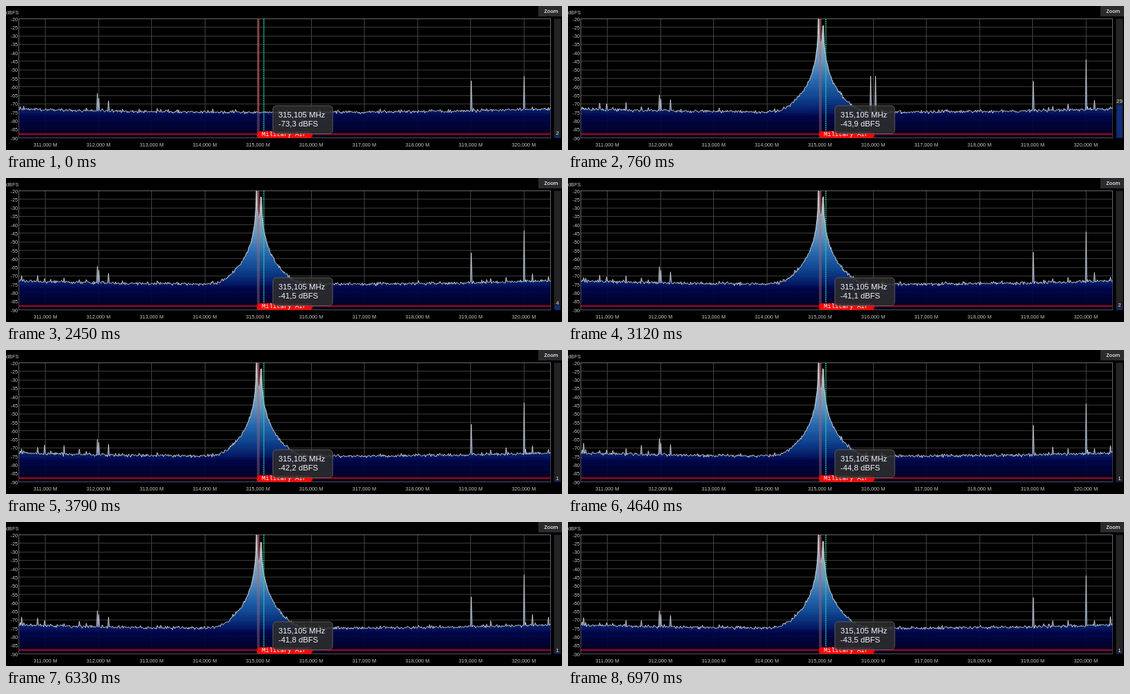
Write an HTML page with a canvas that moves like this. It is 800 px wide and 208 px high and loops after 7000 ms.

```html
<!DOCTYPE html>
<html lang="en">
<head>
<meta charset="utf-8">
<title>Spectrum</title>
<style>
html, body { margin: 0; width: 100%; height: 100%; overflow: hidden; background: #000; }
canvas { display: block; width: 800px; height: 208px; }
</style>
</head>
<body>
<canvas id="view" width="800" height="208"></canvas>
<script>
const LOOP = 7000, STEPS = 211, STEP = LOOP / STEPS, ONSET = 400;
const L = 18.5, R = 783.5, T = 18.5, B = 190.5, DB = (B - T) / 70;
const MID = 363.2, SPLIT = 3.3;
const ARIAL = '"Liberation Sans", Arial, sans-serif';
const AXIS_FONT = '7.3px ' + ARIAL, TIP_FONT = '11.3px ' + ARIAL;

const ctx = document.getElementById('view').getContext('2d');

// Level under the cursor while the carrier is on: time, dBFS
const LEVELS = [[760, -43.9], [2450, -41.5], [3790, -42.2], [4640, -44.8], [5700, -40.9], [6970, -43.5]];

// Steady stations: x, height above the floor
const STATIONS = [[131, 24], [133, 17], [147, 14], [669, 43]];

// Weak spurs that come and go, mirrored about the middle
const SPURS = [22, 45, 55, 83, 105];

const clamp = (v, a, b) => Math.min(b, Math.max(a, v));
const lerp = (a, b, k) => a + (b - a) * k;

function hash(a, b) {
  let h = Math.imul(a + 11, 374761393) ^ Math.imul(b + 7, 668265263);
  h = Math.imul(h ^ (h >>> 13), 1274126177);
  return ((h ^ (h >>> 16)) >>> 0) / 4294967296;
}
const noise = (a, b) => hash(a, b) + hash(a + 5000, b) - 1;

function drift(seed, t) {
  const i = Math.floor(t), k = t - i;
  return lerp(hash(seed, i), hash(seed, i + 1), k * k * (3 - 2 * k));
}

function level(t, n) {
  if (t < ONSET) return -73.3 + noise(801, n) * Math.min(1, n);
  t = clamp(t, LEVELS[0][0], LEVELS[5][0]);
  const i = Math.max(1, LEVELS.findIndex(p => p[0] >= t));
  const [a, b] = [LEVELS[i - 1], LEVELS[i]];
  const k = (t - a[0]) / (b[0] - a[0]);
  return lerp(a[1], b[1], k) + noise(801, n) * 2 * Math.sin(Math.PI * k);
}

// Two close log peaks with a common skirt
function carrier(x, t) {
  const d2 = (x - MID) ** 2;
  const dip = (3 + 8 * drift(900, t / 300)) * Math.exp(-d2 / 3);
  return 7 + dip + 18 * Math.log(Math.abs(d2 - SPLIT ** 2) + 0.05);
}

function softMin(a, b, s) {
  const m = Math.min(a, b);
  return m - s * Math.log(1 + Math.exp(-Math.abs(a - b) / s));
}

function trace(t, n) {
  const gain = clamp((t - ONSET) / 100, 0, 1);
  const ys = [];
  for (let x = 18; x <= 784; x++) {
    const floor = 153.8 - 5 * ((x - 400) / 382) ** 2;
    const bump = 4 * hash(x, 4242) ** 16;
    let y = softMin(floor, carrier(x, t) + (1 - gain) * 170, 4);
    ys.push(y - bump + noise(x, 9999) * 1.3 + noise(x, n) * 2.2);
  }

  const spike = (x, h) => {
    const i = Math.round(x) - 18;
    ys[i] -= h;
  };
  STATIONS.forEach(([x, h]) => spike(x, h));
  spike(745, lerp(49, 72, gain));
  SPURS.forEach((x, i) => {
    const h = 14 * gain * drift(i, t / 900);
    spike(x, h);
    spike(802 - x, h * 0.8);
  });
  const burst = 53 * gain * Math.exp(-Math.max(0, t - 760) / 250);
  spike(435, burst);
  spike(442, burst);
  return ys;
}

function text(s, x, y, font, color = '#c4c4c4', align = 'left') {
  ctx.font = font;
  ctx.fillStyle = color;
  ctx.textAlign = align;
  ctx.fillText(s, x, y);
}

function rect(x, y, w, h, color) {
  ctx.fillStyle = color;
  ctx.fillRect(x, y, w, h);
}

function line(x1, y1, x2, y2, color, width = 1) {
  ctx.strokeStyle = color;
  ctx.lineWidth = width;
  ctx.beginPath();
  ctx.moveTo(x1, y1);
  ctx.lineTo(x2, y2);
  ctx.stroke();
}

function box(x, y, w, h, r, color) {
  ctx.fillStyle = color;
  ctx.beginPath();
  ctx.roundRect(x, y, w, h, r);
  ctx.fill();
}

const area = ctx.createLinearGradient(0, T, 0, B);
[[0, '#c8d0d6'], [0.2, '#9eb8cc'], [0.37, '#689ccc'], [0.52, '#2a70ba'], [0.65, '#114c9c'],
  [0.76, '#062476'], [0.82, '#00064e'], [1, '#00001e']].forEach(([k, c]) => area.addColorStop(k, c));

function axes() {
  text('dBFS', 0, 11.5, AXIS_FONT);
  for (let i = 0; i <= 14; i++) {
    const y = T + i * 5 * DB, row = Math.floor(y) + 0.5;
    line(L, row, R, row, '#3a3a3a');
    text(String(-20 - 5 * i), 17, y + 3, AXIS_FONT, '#c4c4c4', 'right');
  }
  for (let m = 311; m <= 320; m++) {
    const x = 56.5 + (m - 311) * 76.5, col = Math.floor(x) + 0.5;
    line(col, T, col, B, '#424242');
    text(m + ',000 M', x, 202.7, AXIS_FONT, '#c4c4c4', 'center');
  }
  ctx.strokeStyle = '#686868';
  ctx.strokeRect(L, T, R - L, B - T);
}

function spectrum(ys) {
  ctx.save();
  ctx.beginPath();
  ctx.rect(L, T, R - L, B - T);
  ctx.clip();
  const path = new Path2D();
  ys.forEach((y, i) => path.lineTo(18.5 + i, y));
  const fill = new Path2D(path);
  fill.lineTo(R + 1, B);
  fill.lineTo(L, B);
  fill.closePath();
  ctx.globalAlpha = 0.93;
  ctx.fillStyle = area;
  ctx.fill(fill);
  ctx.globalAlpha = 1;
  ctx.strokeStyle = '#d6d8dc';
  ctx.lineWidth = 1;
  ctx.lineJoin = 'round';
  ctx.stroke(path);
  ctx.restore();
}

function markers() {
  rect(361, T, 4, B - T, 'rgba(140,125,130,.35)');
  line(363, T, 363, B, 'rgba(215,40,45,.35)');
  ctx.setLineDash([2, 1]);
  line(371, T, 371, B, '#30cc9c', 1.5);
  ctx.setLineDash([]);
  line(L, 185, R, 185, '#e00808', 1.6);
  box(361, 181, 80, 9.5, 4.5, '#fa0505');
  text('Military Air', 368, 188, '8.9px "Liberation Mono", "Courier New", monospace', '#fff');
}

function tooltip(value) {
  box(384, 144, 86, 40.5, 5, 'rgba(46,46,46,.86)');
  ctx.strokeStyle = '#5c5c5c';
  ctx.lineWidth = 1;
  ctx.stroke();
  text('315,105 MHz', 392, 160.5, TIP_FONT, '#f2f2f2');
  text(value.toFixed(1).replace('.', ',') + ' dBFS', 392, 173.8, TIP_FONT, '#f2f2f2');
}

function meter(value) {
  rect(788.5, T, 10, B - T, '#242426');
  const top = B - value * 1.65;
  rect(789.5, top, 8, B - top, '#0a2370');
  for (let y = Math.ceil(top) + 1; y < B - 1; y += 2) rect(790.5, y, 6, 0.7, '#1a42a4');
  text(String(Math.round(value)), 793.5, top - 1 - value * 0.06, '8px ' + ARIAL, '#e4e4e4', 'center');
}

function snr(t) {
  if (t < ONSET) return 2;
  const rise = clamp((t - ONSET) / 70, 0, 1);
  return Math.max(1, 29 * rise * Math.exp((760 - t) / 850));
}

function draw(time) {
  const n = Math.floor(time / STEP + 0.2) % STEPS;
  const t = n * STEP;
  rect(0, 0, 800, 208, '#000');
  axes();
  line(363, T, 363, B, 'rgba(215,40,45,.75)', 1.5);
  spectrum(trace(t, n));
  markers();
  tooltip(level(t, n));
  meter(snr(t));
  rect(766, 0, 34, 15, '#2b2b2d');
  text('Zoom', 784.5, 9.5, '600 7.2px "Open Sans", sans-serif', '#f0f0f0', 'center');
}

const start = performance.now();
function tick() {
  draw((performance.now() - start) % LOOP);
  requestAnimationFrame(tick);
}
tick();
</script>
</body>
</html>
```
